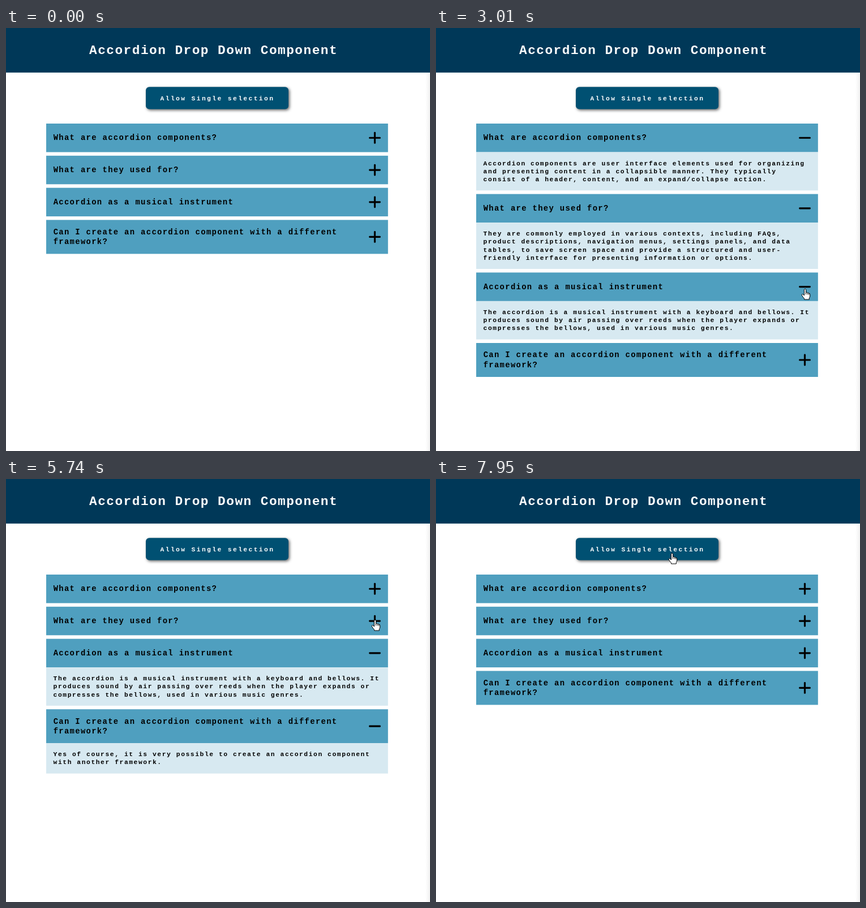
Write an HTML page with a canvas that moves like this. It is 749x748 px and loops after 8 s.

```html
<!DOCTYPE html>
<html lang="en">
<head>
<meta charset="utf-8">
<title>Accordion Drop Down Component</title>
<style>
  html, body { margin: 0; width: 100%; height: 100%; overflow: hidden; background: #fff; }
  canvas { display: block; }
</style>
</head>
<body>
<canvas id="stage" width="749" height="748"></canvas>
<script>
const ctx = document.getElementById('stage').getContext('2d');
const LOOP = 8000, DWELL = 160;
const LEFT = 71, WIDTH = 603.8, TOP = 169, GAP = 6.3, PAD = 12.6;
const HEAD_LINE = 17.45, BODY_LINE = 14.2;
const ICON_X = 651.5, ICON_R = 10.4, ICON_W = 3.2;
const BUTTON = { x: 247, y: 104.2, w: 252, h: 39.4 };

const items = [
  {
    title: ['What are accordion components?'],
    body: ['Accordion components are user interface elements used for organizing',
           'and presenting content in a collapsible manner. They typically',
           'consist of a header, content, and an expand/collapse action.']
  },
  {
    title: ['What are they used for?'],
    body: ['They are commonly employed in various contexts, including FAQs,',
           'product descriptions, navigation menus, settings panels, and data',
           'tables, to save screen space and provide a structured and user-',
           'friendly interface for presenting information or options.']
  },
  {
    title: ['Accordion as a musical instrument'],
    body: ['The accordion is a musical instrument with a keyboard and bellows. It',
           'produces sound by air passing over reeds when the player expands or',
           'compresses the bellows, used in various music genres.']
  },
  {
    title: ['Can I create an accordion component with a different', 'framework?'],
    body: ['Yes of course, it is very possible to create an accordion component',
           'with another framework.']
  }
];

// The items are opened in order, then closed in order.
const clicks = [1290, 2070, 3010, 3520, 4980, 5690, 6190, 6960]
  .map((time, i) => ({ time, item: i % items.length }));

function layout(t) {
  let y = TOP;
  return items.map((item, n) => {
    const open = clicks.filter(c => c.item === n && t >= c.time).length % 2 === 1;
    const headH = item.title.length > 1 ? 60 : 50.5;
    const bodyH = open ? item.body.length * BODY_LINE + 2 * PAD : 0;
    const row = { item, y, headH, bodyH, open };
    y += headH + bodyH + GAP;
    return row;
  });
}

// The pointer rests on each icon around its click and wanders in between.
const rests = clicks.flatMap(({ time, item }) => {
  const row = layout(time - 1)[item];
  const y = row.y + row.headH / 2 - 7 + 5 * item;
  return [-DWELL, DWELL].map(d => ({ t: time + d, x: 652, y }));
});
const wander = [
  { t: 70, x: 424, y: 92 }, { t: 420, x: 447, y: 138 }, { t: 820, x: 588, y: 148 },
  { t: 4060, x: 674, y: 419 }, { t: 4600, x: 655, y: 313 },
  { t: 7480, x: 661, y: 195 }, { t: 7620, x: 661, y: 195 }, { t: 7950, x: 417, y: 131 }
];
const path = [...rests, ...wander].sort((a, b) => a.t - b.t);

const slope = (i, k) => (path[i + 1][k] - path[i][k]) / (path[i + 1].t - path[i].t);

function tangent(i, k) {
  if (i === 0 || i === path.length - 1) return 0;
  const a = slope(i - 1, k), b = slope(i, k);
  return a * b <= 0 ? 0 : 2 * a * b / (a + b);
}

// Monotone cubic through the path points
function pointerAt(t) {
  let i = 0;
  while (i < path.length - 2 && t >= path[i + 1].t) i++;
  const span = path[i + 1].t - path[i].t;
  const u = Math.min(1, (t - path[i].t) / span), v = 1 - u;
  const at = k => path[i][k] * v * v * (1 + 2 * u) + path[i + 1][k] * u * u * (3 - 2 * u)
    + span * u * v * (tangent(i, k) * v - tangent(i + 1, k) * u);
  return { x: Math.round(at('x')), y: Math.round(at('y')) };
}

function text(str, x, y, size, advance, color) {
  const px = size * 0.9, spacing = advance - px * 0.6;
  ctx.font = `bold ${px}px "Courier New", "Liberation Mono", monospace`;
  ctx.letterSpacing = spacing + 'px';
  ctx.fillStyle = color;
  ctx.fillText(str, x + (size - px) * 0.3, y);
}

function band(y, h, color) {
  ctx.fillStyle = color;
  ctx.fillRect(LEFT, y, WIDTH, h);
}

function bar(cx, cy, w, h) {
  ctx.beginPath();
  ctx.roundRect(cx - w / 2, cy - h / 2, w, h, 1.4);
  ctx.fill();
}

function drawRow({ item, y, headH, bodyH, open }) {
  const mid = y + headH / 2;
  band(y, headH, '#4f9fbf');
  item.title.forEach((line, i) => {
    const shift = (i - (item.title.length - 1) / 2) * HEAD_LINE;
    text(line, 83.2, mid + shift + 4.1, 15.4, 9.65, '#000');
  });
  ctx.fillStyle = '#000';
  bar(ICON_X, mid, 2 * ICON_R, ICON_W);
  if (!open) {
    bar(ICON_X, mid, ICON_W, 2 * ICON_R);
    return;
  }
  band(y + headH, bodyH, '#d7e9f1');
  item.body.forEach((line, i) =>
    text(line, 83.2, y + headH + PAD + 10.4 + i * BODY_LINE, 12.5, 8.353, '#000'));
}

function drawButton() {
  ctx.save();
  ctx.shadowColor = 'rgba(0,0,0,.6)';
  ctx.shadowBlur = 5;
  ctx.shadowOffsetX = ctx.shadowOffsetY = 2;
  ctx.fillStyle = '#005072';
  ctx.beginPath();
  ctx.roundRect(BUTTON.x, BUTTON.y, BUTTON.w, BUTTON.h, 6);
  ctx.fill();
  ctx.restore();
  text('Allow Single selection', 272.2, 127.5, 12.5, 9.17, '#fff');
}

const arrow = new Path2D('M.5 .5V12.8L3.3 10.2L5.3 14.8L7.2 14L5.2 9.5H9Z');
const hand = new Path2D('M-1.5 11V1.5Q-1.5 .5 0 .5T1.5 1.5V6.5Q3.8 5.6 4.3 7.4Q6.3 6.6 6.7 8.4' +
  'Q8.7 7.8 8.7 9.8V13Q8.5 15 7.3 16.5V19H-1.5V17.3Q-3.6 15.2 -5.4 12.2Q-6.5 10.2 -5.2 9.6Q-3.8 9 -1.5 12Z');
const fingers = new Path2D('M1.5 6.5V10M4.3 7.4V10.4M6.7 8.4V10.8');

const inside = (p, x, y, w, h) => p.x >= x && p.x < x + w && p.y >= y && p.y < y + h;

function drawPointer(p, rows) {
  const onButton = inside(p, BUTTON.x, BUTTON.y, BUTTON.w, BUTTON.h);
  const onHead = rows.some(r => inside(p, LEFT, r.y, WIDTH, r.headH));
  const isHand = onButton || onHead;
  const shape = isHand ? hand : arrow;
  ctx.save();
  ctx.translate(p.x, p.y);
  ctx.fillStyle = '#fff';
  ctx.strokeStyle = '#000';
  ctx.lineWidth = 1;
  ctx.lineJoin = 'round';
  ctx.fill(shape);
  ctx.stroke(shape);
  if (isHand) ctx.stroke(fingers);
  ctx.restore();
}

const edge = ctx.createLinearGradient(741, 0, 749, 0);
edge.addColorStop(0, 'rgba(0,0,0,0)');
edge.addColorStop(1, 'rgba(0,0,0,.06)');

function draw(t) {
  ctx.fillStyle = '#fff';
  ctx.fillRect(0, 0, 749, 748);
  ctx.fillStyle = edge;
  ctx.fillRect(741, 78, 8, 670);
  ctx.fillStyle = '#003858';
  ctx.fillRect(0, 0, 749, 78.8);
  text('Accordion Drop Down Component', 146.3, 46.1, 25.2, 15.14, '#fff');
  drawButton();
  const rows = layout(t);
  rows.forEach(drawRow);
  if (t >= path[0].t) drawPointer(pointerAt(t), rows);
}

const start = performance.now();
function tick() {
  draw((performance.now() - start) % LOOP);
  requestAnimationFrame(tick);
}
tick();
</script>
</body>
</html>
```
